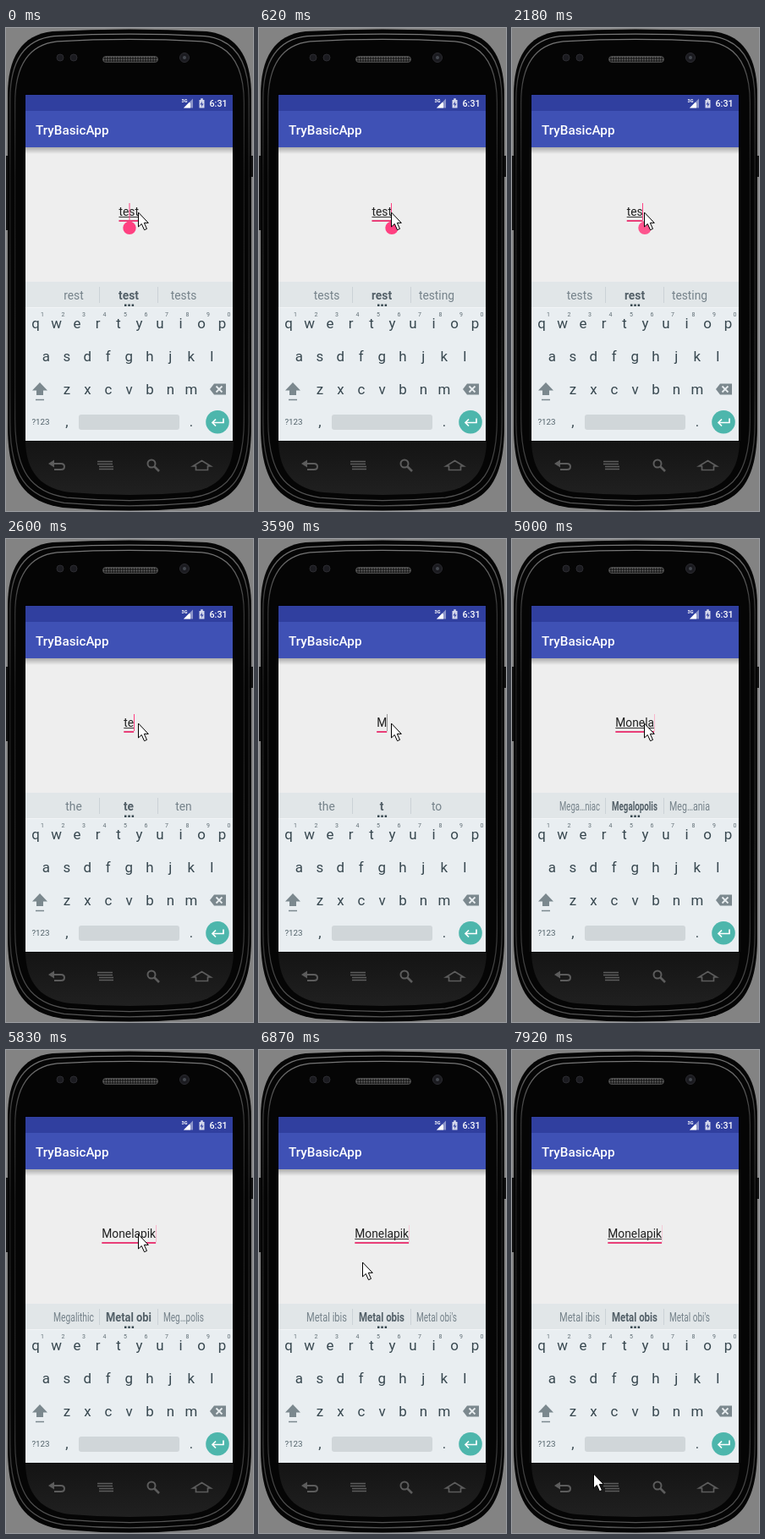
An HTML page that plays this animation: 292x571 px, repeating every 8 s.

```html
<!DOCTYPE html>
<html lang="en">
<head>
<meta charset="utf-8">
<title>Typing demo</title>
<style>
html, body { margin: 0; width: 100%; height: 100%; overflow: hidden; background: #838383; }
svg { display: block; width: 292px; height: 571px; }
text { font-family: Roboto, "Noto Sans", sans-serif; white-space: pre; }
.mid { text-anchor: middle; }
.key { font-size: 16.9px; fill: #37474f; }
.hint { font-size: 7px; fill: #5f6d74; }
.sug { font-size: 13.8px; fill: #75828a; }
.sug.best { font-weight: 700; fill: #536068; }
</style>
</head>
<body>
<svg viewBox="0 0 292 571">
  <defs>
    <path id="body" d="M2 250V80C2 35 18 8 55 4Q146-1 237 4C274 8 290 35 290 80V470C290 535 270 560 225 567Q146 574 67 567C22 560 2 535 2 470z"/>
    <linearGradient id="gloss" x2="0" y2="1">
      <stop offset="0" stop-color="#777"/><stop offset=".12" stop-color="#3a3a3a"/>
      <stop offset=".3" stop-color="#1c1c1c"/><stop offset=".75" stop-color="#262626"/>
      <stop offset="1" stop-color="#555"/>
    </linearGradient>
    <linearGradient id="panel" x2="0" y2="1">
      <stop offset="0" stop-color="#141414"/><stop offset="1" stop-color="#202020"/>
    </linearGradient>
    <linearGradient id="shade" x2="0" y2="1">
      <stop offset="0" stop-color="#000" stop-opacity=".28"/><stop offset="1" stop-color="#000" stop-opacity="0"/>
    </linearGradient>
    <pattern id="mesh" width="3" height="3" patternUnits="userSpaceOnUse">
      <rect width="3" height="3" fill="#1c1c1c"/><circle cx="1.5" cy="1.5" r="1" fill="#666"/>
    </pattern>
  </defs>

  <!-- phone body -->
  <path d="M0 151h3v88h-3zM289 151h3v25h-3z" fill="#111"/>
  <use href="#body" fill="#050505"/>
  <g fill="none" stroke="url(#gloss)" stroke-width="1.3">
    <use href="#body" transform="translate(2.900 5.700) scale(.98)"/>
    <use href="#body" transform="translate(8.800 12) scale(.94 .958)"/>
  </g>
  <path d="M23 489H269C268 530 245 546 215 549Q146 555 77 549C47 546 24 530 23 489z" fill="url(#panel)"/>
  <rect x="114.500" y="33.500" width="65" height="7" rx="3.500" fill="url(#mesh)" stroke="#4a4a4a"/>
  <g fill="#1b1b20" stroke="#2b2b30"><circle cx="64" cy="35" r="4"/><circle cx="80" cy="35" r="4"/><circle cx="211" cy="35" r="5.500"/></g>
  <circle cx="211" cy="35" r="2" fill="#44484f"/>

  <!-- hardware buttons -->
  <g fill="none" stroke="#5c5c5c" stroke-width="2">
    <path d="M54 515h11q4 0 4 3.500t-4 3.500h-8"/>
    <path d="M57 510.500l-7 4.500 7 4.500z" fill="#5c5c5c" stroke="none"/>
    <path d="M108 512.500h18M108 515.500h18M110 518.500h17M110 521.500h17" stroke-width="1.600"/>
    <circle cx="172" cy="515" r="4.500"/><path d="M175.500 518.500l5.500 5.500" stroke-width="2.600"/>
    <path d="M221 518l10.500-6.500 10.500 6.500h-3.500v4.500h-14v-4.500z" stroke-width="1.700"/>
  </g>

  <!-- screen -->
  <path d="M22 78h247v411H22z" fill="#000"/>
  <path d="M23 79h245v62H23z" fill="#3f51b5"/>
  <path d="M23 79h245v19H23z" fill="#303f9f"/>
  <path d="M23 141h245v159H23z" fill="#eee"/>
  <path d="M23 141h245v8H23z" fill="url(#shade)"/>
  <path d="M23 300h245v30H23z" fill="#e1e6e8"/>
  <path d="M23 330h245v158H23z" fill="#e9eef1"/>
  <path d="M23 330.500h245" stroke="#f1f4f6"/>
  <g fill="#fff">
    <text x="207.500" y="88" font-size="5.500" font-weight="700">3G</text>
    <path d="M210 94.500l11-11v11z" opacity=".45"/><path d="M210 94.500l7-7v7z"/><path d="M217 88.500h1v6h-1z"/>
    <path d="M228.500 85h1.700v-1.700h2.600v1.700h1.700v9.500h-6z" opacity=".8"/>
    <path d="M232 86.500l-2.500 4h2l-.500 3 2.500-4h-2z" fill="#303f9f"/>
    <text x="240.500" y="93" font-size="10.700" font-weight="500">6:31</text>
    <text x="35" y="126" font-size="15.300" font-weight="500">TryBasicApp</text>
  </g>
  <path d="M110.500 306v19M179.500 306v19" stroke="#cbd2d6"/>
  <path d="M140 326.500h2.500v2.500h-2.500zM144.300 326.500h2.500v2.500h-2.500zM148.600 326.500h2.500v2.500h-2.500z" fill="#37474f"/>

  <!-- keyboard -->
  <g id="keys"></g>
  <path d="M40 419l9 9.500h-5v5.500h-8v-5.500h-5z" fill="#7b888e"/>
  <path d="M35 439.500h10" stroke="#7b888e" stroke-width="1.500"/>
  <path d="M241 427l5-6.500h14v13h-14z" fill="#7b888e"/>
  <path d="M248.500 423.500l7 7m0-7l-7 7" stroke="#e9eef1" stroke-width="1.800"/>
  <rect x="86" y="457" width="119" height="18" rx="3" fill="#d0d6d9"/>
  <text class="mid" x="41" y="469" font-size="9.800" fill="#53636b">?123</text>
  <circle cx="250" cy="465.700" r="13.800" fill="#4db6ac"/>
  <path d="M257 461.500v5h-13m4-4l-4 4 4 4" fill="none" stroke="#fff" stroke-width="1.700"/>

  <!-- moving parts -->
  <g id="sugs"></g>
  <path id="line" stroke="#e83e78" stroke-width="2"/>
  <text id="typed" class="mid" x="145.200" y="222" font-size="13.800" fill="#212121"></text>
  <path id="under" stroke="#333"/>
  <path id="caret"/>
  <path id="handle" fill="#ff4081" d="M0 227.500l5 3a7.700 7.700 0 1 1-10 0z"/>
  <path id="mouse" fill="#fff" stroke="#000" d="M.5 1v17l3.800-3.500 3.200 7.200 3-1.300-3.200-7h5z"/>
</svg>
<script>
const $ = id => document.getElementById(id);
const MID = 145.2, PINK = '#ff4081', PALE = '#f9b5cb';

function addText(parent, cls, x, y, content = '') {
  const el = document.createElementNS('http://www.w3.org/2000/svg', 'text');
  el.setAttribute('class', cls);
  el.setAttribute('x', x);
  el.setAttribute('y', y);
  el.textContent = content;
  return $(parent).appendChild(el);
}

[['qwertyuiop', 35, 355], ['asdfghjkl', 47.3, 394], ['zxcvbnm', 72, 433]].forEach(([row, x, y], r) =>
  [...row].forEach((ch, i) => {
    addText('keys', 'key mid', x + i * 24.5, y, ch);
    if (!r) addText('keys', 'hint mid', x + 8 + i * 24.5, 341, (i + 1) % 10);
  }));
addText('keys', 'key mid', 72, 471, ',');
addText('keys', 'key mid', 219, 471, '.');

const sugs = [80, 145, 210].map((x, i) => {
  const el = addText('sugs', 'sug mid' + (i === 1 ? ' best' : ''), 0, 321);
  return { el, x, max: i === 1 ? 54 : 48 };
});

// time, typed text, composing underline, suggestions (blank keeps the last), caret colour
const edits = [
  [0, 'test', 1, 'rest|test|tests', PINK],
  [480, 'test', 1, '', PINK],
  [620, 'test', 1, 'tests|rest|testing', PINK],
  [2180, 'tes', 1, '', PINK],
  [2300, 'tes', 1, 'yes|tes|test', PINK],
  [2450, 'te', 1, '', PINK],
  [2600, 'te', 1, 'the|te|ten', PINK],
  [2910, 't', 1, '', PINK],
  [3060, 't', 1, 'the|t|to', PINK],
  [3590, 'M', 0, '', '#999'],
  [3710, 'M', 1, 'More|M|Mine', PINK],
  [4010, 'Mo', 0, '', PINK],
  [4150, 'Mo', 1, 'Meet|Men|Mr', PINK],
  [4290, 'Mon', 0, '', PINK],
  [4440, 'Mon', 1, 'Men|Met|Mag', PINK],
  [4580, 'Mone', 0, 'Mega|Mean|Meal', PINK],
  [4720, 'Monel', 0, '', PINK],
  [4860, 'Monela', 0, '', PINK],
  [5000, 'Monela', 1, 'Mega…niac|Megalopolis|Meg…ania', PALE],
  [5150, 'Monelap', 0, '', PINK],
  [5300, 'Monelapi', 0, '', PINK],
  [5430, 'Monelapi', 1, 'Megalithic|Metal obi|Meg…polis', PALE],
  [5830, 'Monelapik', 0, '', PALE],
  [5980, 'Monelapik', 1, 'Metal ibis|Metal obis|Metal obi\'s', '#f4ccd8'],
];
edits.forEach((e, i) => e[3] = e[3] || edits[i - 1][3]);

// time, pointer x, pointer y
const moves = [
  [0, 156, 217],
  [6440, 148, 225], [6580, 136, 236], [6730, 122, 250], [6880, 109, 263], [7020, 101, 269],
  [7330, 98, 285], [7480, 90, 350], [7620, 89, 430], [7770, 92, 504], [7920, 96, 500],
];

const at = (list, t) => list.filter(e => e[0] <= t).pop();
let shown;

function showEdit(edit) {
  if (edit === shown) return;
  shown = edit;
  const [t, text, composing, words, colour] = edit;
  $('typed').textContent = text;
  const half = $('typed').getComputedTextLength() / 2;
  const span = y => `M${MID - half} ${y}H${MID + half}`;
  $('line').setAttribute('d', span(228));
  $('under').setAttribute('d', composing ? span(223.5) : '');

  const caretX = t ? Math.floor(MID + half) + .5 : 146;
  $('caret').setAttribute('d', `M${caretX} 207v20`);
  $('caret').setAttribute('stroke', colour);
  $('handle').setAttribute('transform', `translate(${t ? 157 : 146})`);
  $('handle').setAttribute('opacity', t < 2180 ? 1 : t === 2180 ? .88 : 0);

  words.split('|').forEach((word, i) => {
    const { el, x, max } = sugs[i];
    el.textContent = word;
    const squeeze = Math.min(1, max / el.getComputedTextLength());
    el.setAttribute('transform', `translate(${x}) scale(${squeeze} 1)`);
  });
}

const start = performance.now();
function draw() {
  const t = (performance.now() - start) % 8000;
  showEdit(at(edits, t));
  const [, x, y] = at(moves, t);
  $('mouse').setAttribute('transform', `translate(${x} ${y})`);
  requestAnimationFrame(draw);
}
draw();
</script>
</body>
</html>
```
